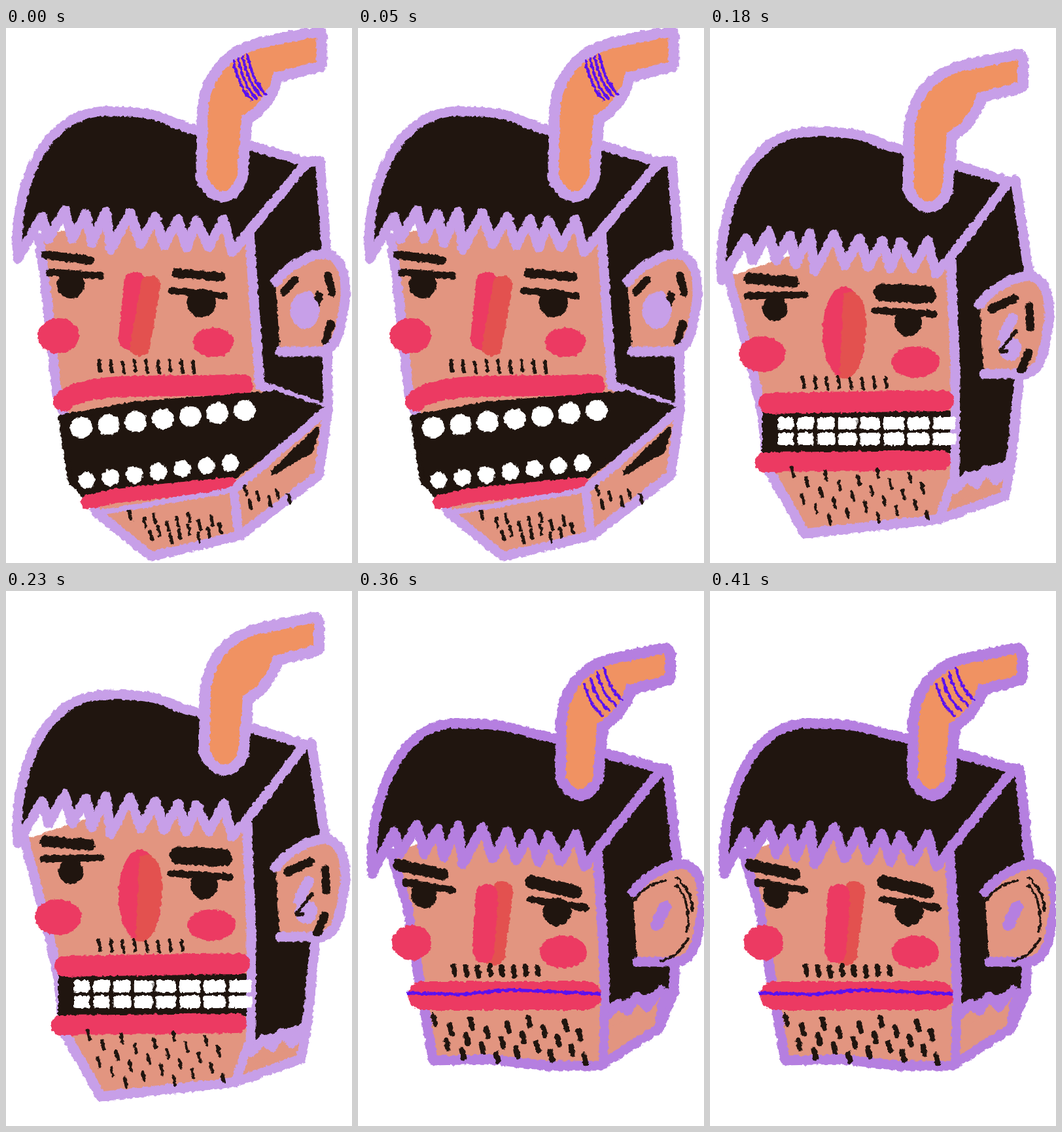
These frames come from a looping animation (529x817 px, 450 ms). An HTML page with a canvas:

```html
<!DOCTYPE html>
<html lang="en">
<head>
<meta charset="utf-8">
<title>Juice box head</title>
<style>
html, body { margin: 0; width: 100%; height: 100%; overflow: hidden; background: #fff }
canvas { display: block; filter: url(#rough) }
svg { position: absolute }
</style>
</head>
<body>
<svg width="0" height="0"><filter id="rough" x="0" y="0" width="1" height="1" color-interpolation-filters="sRGB">
<feTurbulence type="fractalNoise" baseFrequency=".16" numOctaves="2"/>
<feDisplacementMap in="SourceGraphic" scale="6" xChannelSelector="R" yChannelSelector="G"/>
</filter></svg>
<canvas width="529" height="817"></canvas>
<script>
const ctx = document.querySelector('canvas').getContext('2d');
const noise = document.querySelector('feTurbulence');
const ink = '#20150f', skin = '#e29580', red = '#ec3a62', shade = '#e3514f',
  orange = '#f09262', blue = '#5a10f0', white = '#fff';
let edge;

function fill(color, d) {
  ctx.fillStyle = color;
  ctx.fill(new Path2D('M' + d));
}
function pen(color, width, d) {
  ctx.strokeStyle = color;
  ctx.lineWidth = width;
  ctx.stroke(new Path2D('M' + d));
}
function soft(color, d) {
  fill(color, d);
  pen(color, 8, d + 'Z');
}
function oval(color, x, y, rx, ry) {
  ctx.fillStyle = color;
  ctx.beginPath();
  ctx.ellipse(x, y, rx, ry, 0, 0, 7);
  ctx.fill();
}

// Hair spikes from right to left: tip x, tip drop, peak x, peak drop.
const spikes = [[346, 62, 333, 12], [310, 54, 291, 14], [276, 55, 263, 12], [242, 52, 228, 8], [206, 50, 190, 2],
  [160, 58, 153, 0], [131, 48, 122, 4], [101, 42, 90, -2], [65, 42, 55, 8]];

function head(tipX, tipY, apexX, apexY, x, y, fringeY, left, front, right) {
  const side = `${front} ${right} ${x} ${y}Z`;
  const fringe = spikes.map(([a, b, c, d]) => `${a} ${fringeY + b} ${c} ${fringeY + d}`).join(' ');
  const hair = `${tipX} ${tipY}C${tipX - 8} ${tipY - 100} ${tipX + 35} ${apexY} ${apexX} ${apexY}` +
    `S240 ${y - 58} 300 ${y - 47}L${x} ${y} ${front.split(' ', 2).join(' ')} ${fringe}Z`;
  fill(skin, `${left} ${right} ${x} ${y}`);
  pen(edge, 15, `${left} ${right}`);
  for (const part of [side, hair]) {
    fill(ink, part);
    pen(edge, 15, part);
  }
}
function beardEdge(x, y) {
  const zigzag = `${x} ${y}l18-20 14 12 14-23 16 17 21-27`;
  fill(skin, zigzag + 'v25l-83 35Z');
  pen(edge, 14, zigzag);
}
function straw(x, y, sx, sy, stripes) {
  const tube = new Path2D('M-23-18L-22-105Q-18-180 45-200L121-217V-182L65-167Q55-125 23-105L16-18Q0 20-23-18Z');
  const placed = new Path2D();
  placed.addPath(tube, new DOMMatrix([sx, 0, 0, sy, x, y]));
  ctx.strokeStyle = edge;
  ctx.lineWidth = 34;
  ctx.stroke(placed);
  ctx.fillStyle = orange;
  ctx.fill(placed);
  if (!stripes) return;
  const [left, top, stepX, stepY, dx, dy] = stripes;
  for (let i = 0; i < 4; i++)
    pen(blue, 4, `${left + i * stepX} ${top + i * stepY}q${dx * .3} ${dy * .7} ${dx} ${dy}`);
}
function ear(x, y, width, dashes) {
  const shape = `${x} ${y}c18-25 58-45 78-43c30 5 34 55 24 95c-5 35-15 52-35 54l-60 0`;
  fill(skin, shape);
  pen(edge, 15, shape);
  pen(edge, 18, `${x + 36} ${y + 50}l14-28`);
  pen(ink, width, dashes);
}
function eye(x, y, slope, width, lidX, lidLength, lidSlope, r) {
  pen(ink, width, `${x} ${y}l68 ${slope}`);
  pen(ink, 11, `${lidX} ${y + 27}l${lidLength} ${lidSlope}`);
  oval(ink, x + 39, y + 46, r, r);
}
function row(x, y, count, step, height, width = 5) {
  for (let i = 0; i < count; i++) pen(ink, width, `${x + i * step} ${y + i % 3}l2 ${height}`);
}
function teeth(x, y, endX, endY, count, rx, ry) {
  for (let i = 0; i < count; i++) {
    const t = i / (count - 1);
    oval(white, x + (endX - x) * t, y + (endY - y) * t, rx, ry);
  }
}
function stubble(x, y, width, height, count, lean, weight = 5) {
  for (let i = 0; i < count; i++) {
    const u = i * .618 % 1, v = i / count;
    pen(ink, weight, `${x + lean * v + u * (width - lean * v)} ${y + height * v}l3 13`);
  }
}

function gape() {
  head(18, 352, 155, 127, 460, 205, 280,
    '50 320 60 390 78 560 138 740 222 807 358 775 478 683', '372 310 380 430 388 545', '492 582 490 342 480 203');
  straw(334, 248, 1.16, 1.08, [348, 50, 7, -3, 28, 60]);
  ear(412, 388, 12, '425 403l17-19M492 378l7 27M478 408l-2 12M497 452l-9 26');
  oval(edge, 457, 432, 22, 28);
  eye(60, 346, 9, 13, 66, 79, 5, 21);
  eye(260, 374, 6, 14, 253, 82, 8, 22);
  pen(red, 36, '198 390 190 474');
  pen(shade, 30, '221 393 205 486');
  oval(red, 80, 470, 32, 27);
  oval(red, 317, 480, 31, 23);
  row(142, 507, 9, 18, 17);
  pen(red, 32, '88 570Q110 548 200 547L362 545');
  soft(ink, '84 594 200 574 410 558 486 582 400 648 350 684 240 693 122 716 98 690');
  pen(red, 22, '125 724 170 714 342 697');
  teeth(115, 610, 365, 584, 7, 17, 16);
  teeth(123, 691, 343, 664, 7, 13, 13);
  soft(ink, '409 678 430 657 476 613 466 645');
  pen(edge, 14, '492 582 348 705 356 775');
  pen(edge, 8, '138 741 345 706');
  stubble(188, 738, 145, 38, 16, 35);
  stubble(365, 700, 78, 25, 6, 0);
}
function shout() {
  head(24, 347, 165, 122, 450, 187, 277,
    '50 320 68 410 90 520 98 670 225 803 378 768 450 710', '357 315 362 430 366 522', '462 541 478 342 463 184');
  pen(edge, 14, '483 490 476 530 462 545');
  straw(335, 235, 1, 1, [330, 78, 10, -12, 37, 43]);
  ear(408, 373, 12, '422 383l38-23M488 358l12 22M494 412l-4 24M488 462l-20 12');
  eye(63, 341, 8, 14, 60, 90, 7, 18);
  eye(260, 356, 16, 16, 255, 82, 12, 20);
  pen(red, 30, '197 380 187 452');
  pen(shade, 30, '219 379 215 430 190 468');
  oval(red, 85, 448, 34, 25);
  oval(red, 314, 463, 38, 26);
  row(143, 486, 10, 14, 15);
  soft(ink, '96 549 400 534 452 543 380 617 360 636 250 648 112 655');
  pen(red, 34, '90 526 355 524');
  pen(red, 26, '107 674 200 668 350 651');
  teeth(121, 567, 358, 560, 7, 17, 16);
  teeth(128, 637, 351, 617, 7, 15, 13);
  soft(ink, '382 646 452 576 440 638 383 698');
  pen(edge, 14, '464 543 370 642 375 768');
  stubble(143, 693, 212, 95, 30, 70);
  stubble(388, 698, 38, 25, 4, 0);
}
function grin() {
  head(18, 385, 155, 158, 457, 234, 313,
    '28 380 60 500 78 580 90 675 145 772 350 750 450 715', '368 350 375 520 374 695', '460 665 488 380 467 232');
  beardEdge(375, 705);
  pen(edge, 14, '372 690 350 750M460 665 450 715');
  straw(337, 264, 1.1, .99);
  ear(412, 422, 13, '430 429l35-16M488 425l2 32M487 496l-11 26');
  oval(edge, 459, 490, 17, 18);
  pen(ink, 5, '468 463 443 494 454 493');
  eye(60, 382, 6, 17, 56, 89, -2, 19);
  eye(264, 404, 3, 27, 252, 90, 6, 21);
  oval(red, 205, 465, 33, 70);
  fill(shade, '204 405C246 390 245 470 227 518Q215 540 198 534Z');
  oval(red, 80, 498, 36, 27);
  oval(red, 314, 510, 37, 24);
  row(142, 533, 8, 18, 16);
  soft(ink, '84 588H364V645H84Z');
  pen(red, 32, '90 573 357 569');
  pen(red, 30, '84 663 353 660');
  for (let x = 108, width = 16; x < 350; x += width + 13, width += 1.6)
    for (const y of [598, 622]) soft(white, `${x} ${y}h${width}v11h${-width}`);
  stubble(125, 671, 210, 76, 24, 15);
}
function clench() {
  head(14, 390, 165, 179, 458, 248, 330,
    '45 360 60 470 80 565 110 710 220 728 340 748 445 660', '355 368 362 500 370 635', '462 608 477 392 464 248');
  beardEdge(368, 650);
  pen(edge, 14, '370 640 345 745M460 612 445 660');
  straw(331, 290, 1.1, 1, [324, 128, 7, -7, 46, 36]);
  ear(405, 432, 12, '420 427l37-14M500 435l1 47M450 530l32-16');
  pen(edge, 9, '478 425 487 470 478 508');
  eye(60, 391, 11, 17, 68, 70, 5, 17);
  eye(265, 416, 12, 17, 262, 68, 12, 16);
  pen(red, 30, '193 430 187 505');
  pen(shade, 32, '211 432 206 505 191 524');
  oval(red, 73, 512, 36, 29);
  oval(red, 305, 517, 34, 26);
  oval(skin, 309, 517, 14, 8);
  row(141, 537, 10, 13.5, 12);
  soft(ink, '84 572 351 574 351 606 84 603');
  pen(red, 20, '92 557 200 554 345 560');
  pen(red, 18, '92 614 260 620 347 614');
  teeth(108, 590, 340, 590, 8, 16, 15);
  stubble(117, 636, 222, 90, 32, 25);
  stubble(374, 660, 60, 25, 6, 0);
}
function pout() {
  head(22, 432, 150, 202, 464, 272, 359,
    '50 400 75 480 95 600 115 717 200 715 290 725 370 725 460 668', '366 395 375 540 378 640', '483 612 489 422 473 272');
  beardEdge(380, 650);
  pen(edge, 14, '377 640 375 722M483 612 465 630 460 668');
  straw(342, 302, 1.05, .95, [346, 142, 10, -8, 28, 48]);
  pen(edge, 5, '476 99Q465 118 478 135');
  ear(420, 460, 4, '420 475Q435 450 470 442M487 450Q510 475 503 520M487 438Q512 460 511 488M505 530Q490 560 462 565');
  eye(62, 418, 15, 18, 72, 73, 12, 20);
  eye(265, 444, 16, 20, 264, 84, 13, 22);
  pen(shade, 34, '220 460 208 555');
  pen(red, 34, '197 464 192 550');
  oval(red, 82, 537, 30, 27);
  oval(red, 314, 551, 36, 25);
  row(146, 573, 8, 18.3, 12, 8);
  pen(red, 44, '98 618 350 618');
  pen(blue, 5, '76 614 160 616 230 609 300 612 370 615');
  stubble(115, 648, 235, 64, 22, 20, 8);
}

const poses = [gape, shout, grin, clench, pout];
ctx.lineCap = ctx.lineJoin = 'round';
let shown;
function play() {
  const pose = Math.floor(performance.now() % 450 / 90);
  if (pose !== shown) {
    shown = pose;
    edge = poses[pose] === pout ? '#b57fe0' : '#c79fe8';
    noise.setAttribute('seed', pose + 1);
    ctx.fillStyle = white;
    ctx.fillRect(0, 0, 529, 817);
    poses[pose]();
  }
  requestAnimationFrame(play);
}
play();
</script>
</body>
</html>
```
